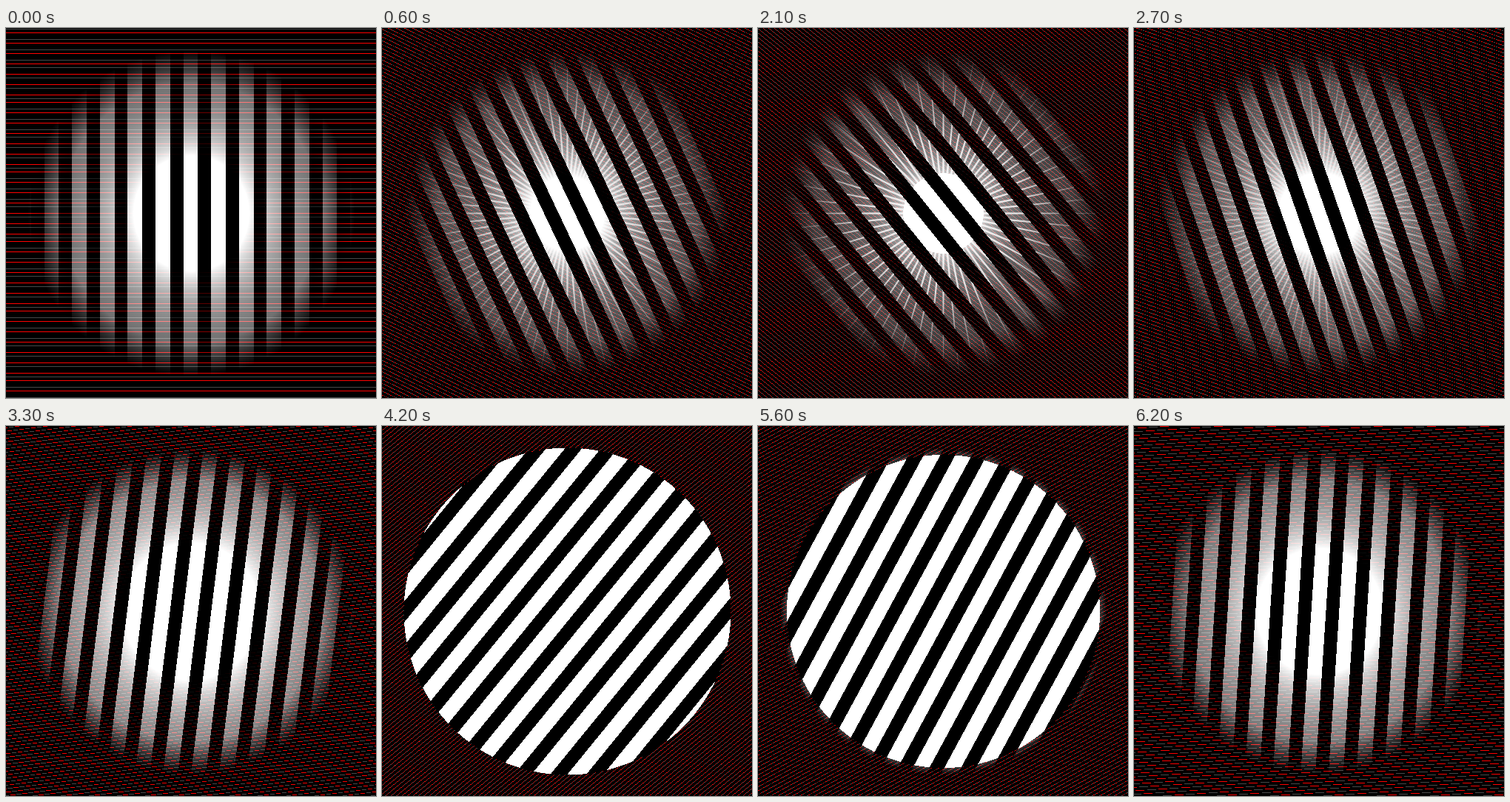
Recreate the animation shown at these times as an HTML page with a canvas. Size 500x500 px, loop 6300 ms.

```html
<!DOCTYPE html>
<html>
<head>
<meta charset="utf-8">
<style>
html, body { margin: 0; width: 100%; height: 100%; overflow: hidden; background: #000; }
canvas { display: block; }
</style>
</head>
<body>
<canvas id="stage" width="500" height="500"></canvas>
<script>
const SIZE = 500, MID = 250, EDGE = 221;
const LINE_GAP = 4.7, STRIPE_GAP = 37.6, GREY = 72;
const ctx = document.getElementById('stage').getContext('2d');
const image = ctx.createImageData(SIZE, SIZE);
const pixels = image.data;

// Signed distance from the nearest multiple of period
const offset = (value, period) => value - period * Math.round(value / period);

// Opacity of the disc: a falloff from the centre, broken into rays while swing is high
function discAlpha(x, y, swing) {
  const r = Math.hypot(x, y);
  if (r >= EDGE) return 0;
  const open = Math.max(0, swing);
  const reach = 78 / Math.max(1e-4, 1 + swing);
  if (r < reach + 40 * open ** 8) return 1;
  const rim = Math.min(1, (EDGE - r) / 45);
  const base = Math.min(1, reach / r * rim);
  if (!open) return base;
  const step = Math.PI / Math.round(60 / (1 + swing));
  const side = Math.abs(offset(Math.atan2(y, x), step)) * r;
  const halfWidth = 1.7 - r / 170;
  const cover = Math.max(0, Math.min(1, halfWidth - side + 0.5));
  const glow = Math.min(1, 1.5 * open) * Math.min(0.8, (EDGE - r) / 150);
  return base + (1 - base) * cover * glow;
}

function draw(t) {
  const swing = Math.sin(t), tilt = Math.PI / 4 * swing;
  const c = Math.cos(tilt), s = Math.sin(tilt);
  let i = 0;
  for (let py = 0; py < SIZE; py++) {
    const y = py - MID;
    for (let px = 0; px < SIZE; px++) {
      const x = px - MID;
      // Stripes and hairlines turn in opposite directions
      const across = (x + 0.5) * c - (y + 0.5) * s + 0.5;
      const white = Math.abs(offset(across, STRIPE_GAP)) < 9.9 ? 255 : 0;
      const onLine = Math.abs(offset(y * c - x * s - 0.1, LINE_GAP)) < 0.39;
      const red = onLine ? (py % 2 ? GREY : 255) : 0;
      const grey = onLine && py % 2 ? GREY : 0;
      const alpha = discAlpha(x, y, swing);
      pixels[i++] = red + (white - red) * alpha;
      pixels[i++] = pixels[i++] = grey + (white - grey) * alpha;
      pixels[i++] = 255;
    }
  }
  ctx.putImageData(image, 0, 0);
}

const start = performance.now();
let shown = -1;
function tick() {
  const step = Math.floor((performance.now() - start) / 100) % 63;
  if (step !== shown) draw((shown = step) / 10);
  requestAnimationFrame(tick);
}
tick();
</script>
</body>
</html>
```
